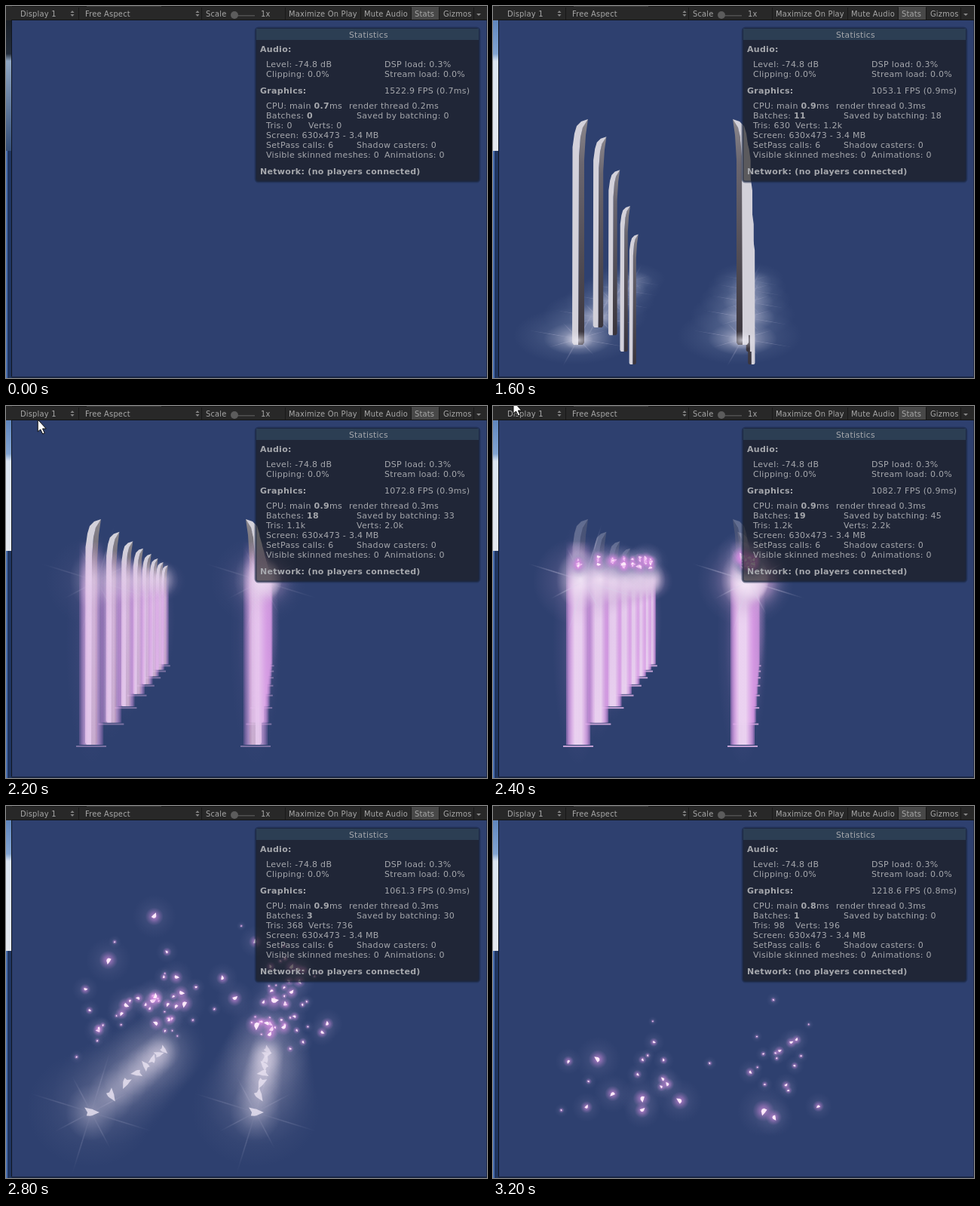
These frames come from a looping animation (638 px wide and 493 px high, 3.4 s). An HTML page with a canvas:

```html
<!DOCTYPE html>
<html lang="en">
<head>
<meta charset="utf-8">
<title>Rising pillars</title>
<style>
html, body { margin: 0; width: 100%; height: 100%; overflow: hidden; background: #2e406f; }
canvas { display: block; }
</style>
</head>
<body>
<canvas id="stage" width="638" height="493"></canvas>
<script>
const ctx = document.getElementById('stage').getContext('2d');
const LOOP = 3400, HOLD = 1200, STEP = 200, PILLARS = 8, SPARKS = 95;
const FONT = '"DejaVu Sans", sans-serif';

// Counter values at a few key steps
const KEY_STEPS = [0, 1, 3, 5, 7, 9, 11];
const COUNTERS = {
  fps: [1522.9, 1522.9, 1053.1, 1072.8, 1082.7, 1061.3, 1218.6],
  batches: [0, 3, 11, 17, 19, 3, 1],
  saved: [0, 2, 18, 20, 45, 30, 0],
  tris: [0, 126, 630, 988, 1200, 368, 98]
};

const mix = (a, b, u) => a + (b - a) * u;
const clamp = v => Math.max(0, Math.min(1, v));
const pulse = (k, from, peak, to) => clamp(k < peak ? (k - from) / (peak - from) : (to - k) / (to - peak));

function seeded(seed) {
  return () => {
    seed = (seed * 1664525 + 1013904223) >>> 0;
    return seed / 4294967296;
  };
}

// Two rows of pillars, the farthest first
const columns = [];
for (let i = PILLARS - 1; i >= 0; i--) {
  const s = 1 / (1 + .183 * i), far = 1 - s, base = 449 - 190 * far;
  columns.push({ i, s, base, side: 1, x: 113 + 171 * far }, { i, s, base, side: -1, x: 331 + 28 * far });
}

const rand = seeded(41);
const bell = () => rand() + rand() + rand() - 1.5;
const sparks = Array.from({ length: SPARKS }, () => {
  const c = columns[Math.floor(rand() * columns.length)];
  const size = (1.6 + 5.5 * rand() ** 2) * (.45 + .55 * c.s);
  return {
    x0: c.x, y0: 200 + 14 * rand(),
    x: c.x + 20 + 55 * bell(),
    y: 225 + 62 * c.s + 50 * bell() - 90 * rand() ** 5,
    fall: 45 + 16 * size, size, turn: rand() * 6, lasts: rand() < .36
  };
});

function box(x, y, w, h, fill) {
  ctx.fillStyle = fill;
  ctx.fillRect(x, y, w, h);
}

function glow(x, y, rx, ry, rgb, alpha) {
  if (alpha <= 0) return;
  ctx.save();
  ctx.translate(x, y);
  ctx.scale(rx, ry);
  const g = ctx.createRadialGradient(0, 0, 0, 0, 0, 1);
  [1, .6, .25, 0].forEach((a, n) => g.addColorStop(n / 3, `rgba(${rgb},${a * alpha})`));
  box(-1, -1, 2, 2, g);
  ctx.restore();
}

function rays(x, y, radius, alpha, squash = 1) {
  for (let n = 0; n < 8; n++) {
    const r = radius * (n % 2 ? .65 : 1);
    ctx.save();
    ctx.translate(x, y);
    ctx.scale(1, squash);
    ctx.rotate(n * Math.PI / 4 + .3);
    glow(r / 2, 0, r / 2, 1.5, '215,210,235', alpha);
    ctx.restore();
  }
}

function path(points, fill) {
  ctx.beginPath();
  points.forEach(p => ctx.lineTo(p[0], p[1]));
  ctx.closePath();
  ctx.fillStyle = fill;
  ctx.fill();
}

function blade(c, drop) {
  ctx.save();
  ctx.translate(c.x, c.base + drop * c.s);
  ctx.scale(c.s * c.side, c.s);
  const dark = ctx.createLinearGradient(0, -299, 0, 0);
  dark.addColorStop(0, '#8b878d');
  dark.addColorStop(.2, '#6a666f');
  dark.addColorStop(1, '#39343c');
  path([[0, 0], [1, -250], [3, -275], [6, -289], [13, -299], [10, -278], [8, -245], [8, -3], [6, 0]], dark);
  path([[-8, -3], [-7.5, -262], [-5, -280], [-2, -290], [4, -296], [13, -299], [6, -288], [3, -275], [1, -250], [0, 0], [-6, 0]], '#d3d1da');
  ctx.restore();
}

function beam(c, alpha) {
  if (!alpha) return;
  const h = 270 * c.s, top = c.base - h, layers = 6;
  ctx.save();
  ctx.globalAlpha = alpha;
  glow(c.x, c.base - h / 2, 34 * c.s, h * .6, '175,135,200', .3);
  for (let n = 0; n < layers; n++) {
    const w = 16 * c.s * (1 - n / layers * .8);
    const rgb = `${mix(212, 246, n / layers)},${mix(145, 240, n / layers)},${mix(226, 248, n / layers)}`;
    const g = ctx.createLinearGradient(0, top, 0, c.base);
    g.addColorStop(0, `rgba(${rgb},0)`);
    g.addColorStop(.25, `rgba(${rgb},.5)`);
    g.addColorStop(1, `rgba(${rgb},.5)`);
    box(c.x - w, top, w * 2, h, g);
  }
  box(c.x - 20 * c.s, c.base + 1, 40 * c.s, 2, 'rgba(232,185,238,.8)');
  ctx.restore();
}

function star(x, y, size, turn, points, fill) {
  path(Array.from({ length: points * 2 }, (_, n) => {
    const r = size * (n % 2 ? .45 : 1 - .3 * (n % 3)), a = n * Math.PI / points + turn;
    return [x + r * Math.cos(a), y + r * Math.sin(a)];
  }), fill);
}

function drawPillars(k) {
  const age = c => 80 + (k - 1) * STEP - c.i * 87;
  const shown = columns.filter(c => k > 0 && k < 8 && age(c) > 60);
  shown.forEach(c => {
    const a = pulse(k, -.5, 3, c.side > 0 ? 6 : 5) * Math.min(1, .4 + age(c) / 600);
    const y = c.base - 12 * c.s;
    glow(c.x - 4, y, 82 * c.s, 38 * c.s, '130,145,180', a * .5);
    glow(c.x, y + 4 * c.s, 46 * c.s, 22 * c.s, '215,212,230', a * a * .7);
    rays(c.x, y + 4 * c.s, 70 * c.s, a * a * .25, .55);
  });
  shown.forEach(c => {
    const left = clamp(1 - age(c) / 440);
    ctx.globalAlpha = k === 7 ? .3 : 1;
    blade(c, 235 * left * left * (3 - 2 * left));
    ctx.globalAlpha = 1;
    if (!c.i) glow(c.x, c.base - 6, 20, 12, '240,238,248', pulse(k, 1, 3, 5) * .7);
  });
}

function drawBurst(k) {
  const beams = pulse(k, 5, 7, 9), flash = beams ** 1.5, stars = pulse(k, 7, 9, 11);
  columns.forEach(c => glow(c.x, c.base - 48 * c.s, 35 + 50 * c.s, 35 + 42 * c.s, '150,150,180', stars * .24));
  columns.forEach(c => beam(c, beams));
  columns.forEach(c => {
    const y = c.base - 43 * c.s;
    glow(c.x + 4 * c.s, 232, 64 * c.s, 60 * c.s, '190,155,205', flash * .42);
    glow(c.x + 3 * c.s, 230, 8 + 24 * c.s, 10 + 30 * c.s, '255,244,255', flash * .85);
    glow(c.x, y, 14 + 20 * c.s, 18 + 20 * c.s, '222,214,232', stars * .4);
    if (!c.i) {
      rays(c.x + 8, 232, 78, flash * .4);
      rays(c.x, y, 85, stars * .18);
    }
    ctx.globalAlpha = stars * .8;
    star(c.x, y, 4 + 7 * c.s, c.i, 5, '#eae4f2');
    ctx.globalAlpha = 1;
  });
}

function drawSparks(k) {
  if (k < 7) return;
  const u = (k - 7) / 4, out = Math.min(1, u * 2), late = Math.max(0, u * 2 - 1);
  const alive = sparks.filter(p => p.lasts || k < 11).map(p => ({
    ...p,
    x: mix(p.x0, p.x, out + late * .15),
    y: mix(p.y0, p.y, out) + late * p.fall,
    alpha: p.lasts ? 1 : 1 - late
  }));
  alive.forEach(p => glow(p.x, p.y, p.size * 5.5, p.size * 5.5, '125,125,170', p.alpha * .32));
  alive.forEach(p => {
    glow(p.x, p.y, p.size * 2.3, p.size * 2.3, '218,140,228', p.alpha * .75);
    ctx.globalAlpha = p.alpha;
    star(p.x, p.y, p.size * 1.1, p.turn + k, 3, '#fdeafa');
    ctx.globalAlpha = 1;
  });
}

function text(str, x, y, { size = 11, bold = false, spacing = .3, color = '#a6a8ad' } = {}) {
  ctx.font = `${bold ? 'bold ' : ''}${size}px ${FONT}`;
  ctx.letterSpacing = `${spacing}px`;
  ctx.fillStyle = color;
  ctx.fillText(str, x, y);
  return x + ctx.measureText(str).width;
}

function counter(name, k, smooth = true) {
  const values = COUNTERS[name], n = KEY_STEPS.findLastIndex(step => step <= k);
  if (!smooth || KEY_STEPS[n] === k) return values[n];
  return Math.round((values[n] + values[n + 1]) / 2);
}

function drawStats(k) {
  const short = n => n < 1000 ? `${Math.floor(n)}` : `${(n / 1000).toFixed(1)}k`;
  const fps = counter('fps', k, false), ms = 1000 / fps, frame = ms.toFixed(1);
  const count = counter('tris', k), tris = short(count), verts = short(count * (k > 8 ? 2 : 1.83));
  const bold = { bold: true };
  ctx.beginPath();
  ctx.roundRect(331, 29, 297, 204, 4);
  ctx.fillStyle = 'rgba(24,24,24,.64)';
  ctx.fill();
  ctx.strokeStyle = 'rgba(28,42,74,.55)';
  ctx.lineWidth = 3;
  ctx.stroke();
  box(332, 30, 295, 15, 'rgba(65,100,130,.38)');

  text('Statistics', 455, 42, { size: 10.7 });
  text('Audio:', 337, 61, bold);
  text('Level: -74.8 dB', 345, 81);
  text('DSP load: 0.3%', 502, 81);
  text('Clipping: 0.0%', 345, 94);
  text('Stream load: 0.0%', 502, 94);
  text('Graphics:', 337, 116, bold);
  text(`${fps} FPS (${frame}ms)`, 502, 116);
  text('ms', text(frame, text('CPU: main ', 345, 136), 136, bold), 136);
  text(`render thread ${(ms * .32).toFixed(1)}ms`, 455, 136);
  text(counter('batches', k), text('Batches: ', 345, 149), 149, bold);
  text(`Saved by batching: ${counter('saved', k)}`, 465, 149);
  text(`Tris: ${tris}`, 345, 162);
  text(`Verts: ${verts}`, tris.endsWith('k') ? 465 : 401, 162);
  text('Screen: 630x473 - 3.4 MB', 345, 175);
  text('SetPass calls: 6', 345, 188);
  text('Shadow casters: 0', 465, 188);
  text('Visible skinned meshes: 0', 345, 201);
  text('Animations: 0', 502, 201);
  text('Network: (no players connected)', 337, 223, bold);
}

function arrows(x) {
  path([[x - 2.5, 9], [x, 6], [x + 2.5, 9]], '#858585');
  path([[x - 2.5, 11], [x, 14], [x + 2.5, 11]], '#858585');
}

function drawToolbar() {
  box(0, 0, 638, 19, '#282828');
  box(8, 0, 630, 1, '#191919');
  box(107, 0, 99, 1, '#3a3a3a');
  box(538, 1, 36, 17, '#484848');
  box(7, 18, 631, 1, '#121417');
  [96, 259, 370, 470, 537, 574, 620].forEach(x => box(x, 2, 1, 16, '#181818'));
  const labels = { 'Display 1': 19, 'Free Aspect': 105, 'Scale': 265, '1x': 338,
    'Maximize On Play': 375, 'Mute Audio': 475, 'Stats': 542, 'Gizmos': 580 };
  for (const label in labels) text(label, labels[label], 14, { size: 9.9, spacing: .2, color: '#a8a8a8' });
  arrows(88);
  arrows(254);
  box(300, 12, 30, 1.5, '#505050');
  ctx.beginPath();
  ctx.arc(303, 12, 5, 0, 7);
  ctx.fillStyle = '#5c5c5c';
  ctx.fill();
  path([[624, 10], [630, 10], [627, 13]], '#8a8a8a');
}

function drawWindowEdge(k) {
  const edge = ctx.createLinearGradient(0, 0, 0, 192);
  const shades = k ? ['#5079b5', '#83a5d3', '#dbe5f1', '#e5e9ef'] : ['#15191f', '#232d3b', '#8fa6c2', '#344e77'];
  [0, .33, .38, 1].forEach((at, n) => edge.addColorStop(at, shades[n]));
  box(0, 0, 8, 493, '#1f3560');
  box(0, 192, 2, 301, '#4a70b2');
  box(0, 0, 7, 192, edge);
  box(7, 0, 1, 493, '#10151f');
  box(7, 491, 631, 2, '#1b2744');
  box(637, 19, 1, 474, '#1f2b4a');
}

function drawCursor(k) {
  if (k < 4 || k > 7) return;
  const u = Math.sin(clamp((k - 5) / 2) * Math.PI / 2);
  ctx.save();
  ctx.translate(mix(79, 27, u), mix(76, -6, u));
  path([[0, 0], [0, 16], [3.5, 13], [6.5, 19], [9, 18], [6.3, 12], [11, 12]], '#fff');
  ctx.strokeStyle = '#111';
  ctx.lineWidth = 1;
  ctx.stroke();
  ctx.restore();
}

function draw(k) {
  box(0, 0, 638, 493, '#2e406f');
  drawPillars(k);
  drawBurst(k);
  drawSparks(k);
  drawStats(k);
  drawWindowEdge(k);
  drawToolbar();
  drawCursor(k);
}

let current = -1;
const start = performance.now();
function tick() {
  const t = (performance.now() - start) % LOOP;
  const k = t < HOLD ? 0 : 1 + Math.floor((t - HOLD) / STEP);
  if (k !== current) draw(current = k);
  requestAnimationFrame(tick);
}
tick();
</script>
</body>
</html>
```
